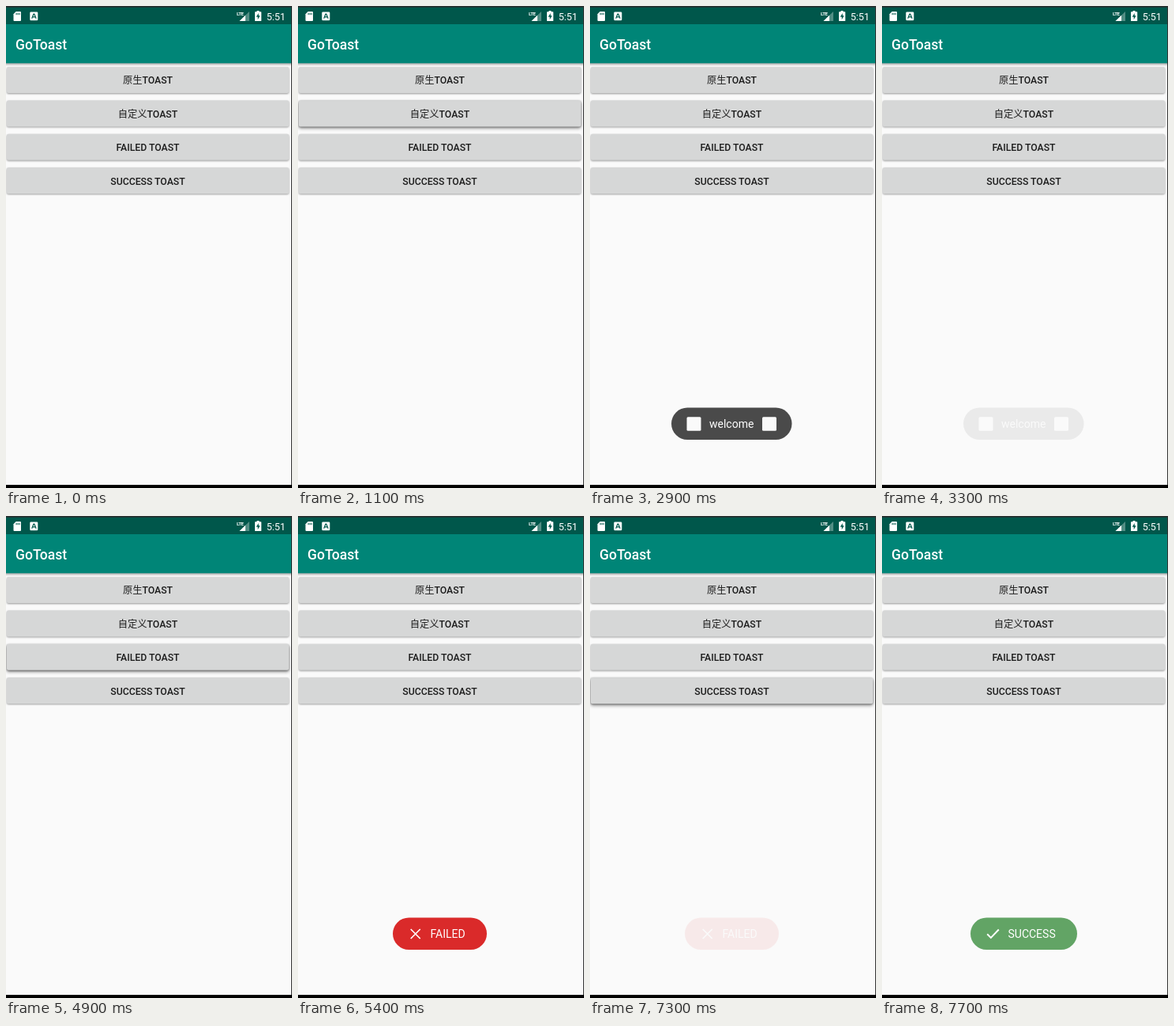
Recreate the animation shown at these times as an HTML page. Size 362x609 px, loop 8000 ms.

```html
<!DOCTYPE html>
<html lang="zh-CN">
<head>
<meta charset="utf-8">
<title>GoToast</title>
<style>
  html, body { margin: 0; width: 362px; height: 609px; overflow: hidden; background: #fafafa; }
  svg { display: block; }
  text { font-family: Roboto, "Noto Sans CJK SC", "Noto Sans CJK", sans-serif; fill: #fff; }
  .label { font-size: 12.25px; font-weight: 500; fill: #1d1d1d; text-anchor: middle; }
  .label .han { font-family: "Noto Sans CJK SC", "Noto Sans CJK", sans-serif; font-weight: 400; }
  .toast text { font-size: 14px; }
  .toast path { fill: none; stroke: #fff; }
</style>
</head>
<body>
<svg width="362" height="609" viewBox="0 0 362 609">
  <defs>
    <linearGradient id="drop" x2="0" y2="1">
      <stop offset="0" stop-opacity=".34"/>
      <stop offset="1" stop-opacity="0"/>
    </linearGradient>
    <filter id="low" x="-5%" y="-30%" width="110%" height="170%"><feGaussianBlur stdDeviation=".9"/></filter>
    <filter id="high" x="-5%" y="-40%" width="110%" height="190%"><feGaussianBlur stdDeviation="2.3"/></filter>
  </defs>

  <rect width="362" height="609" fill="#fafafa"/>
  <g id="buttons"></g>

  <rect y="72" width="361" height="4" fill="url(#drop)"/>
  <rect y="23" width="361" height="49.3" fill="#008577"/>
  <rect y="1" width="361" height="22" fill="#00574b"/>
  <text x="12" y="55" font-size="17.5" font-weight="500">GoToast</text>

  <!-- status bar -->
  <path d="M12.6 7H18a1 1 0 0 1 1 1v10a1 1 0 0 1-1 1h-7.500a1 1 0 0 1-1-1v-7.800z" fill="#fff"/>
  <path d="M13.100 8.800v2.400M15.100 8.800v2.400M17.100 8.800v2.400" stroke="#00574b"/>
  <rect x="30.300" y="7.600" width="10" height="10.600" rx="1.200" fill="#fff"/>
  <path d="M32.700 15.800l2.300-5.800h.8l2.300 5.800M33.800 13.900h3.300" fill="none" stroke="#00574b" stroke-width="1.200"/>
  <path d="M308 7v12h-12.500z" fill="#fff" opacity=".32"/>
  <path d="M303 11.800v7.200h-7.500z" fill="#fff"/>
  <text x="292" y="12" font-size="6.200" font-weight="700" letter-spacing="-.5">LTE</text>
  <path d="M317.500 7.300V6h3v1.300h2.100q.6 0 .6.600v10.500q0 .6-.6.600h-7q-.6 0-.6-.6V7.900q0-.6.600-.6z" fill="#fff"/>
  <path d="M319.700 9l-3 4.800h2v3.400l2.900-4.900h-1.900z" fill="#00574b"/>
  <text x="329.800" y="17.500" font-size="12.500">5:51</text>

  <g class="toast" id="welcome">
    <rect x="103" y="507.500" width="152.500" height="40.500" rx="20.250" fill="#323232"/>
    <rect x="122.500" y="519.300" width="18" height="17.500" rx="1.500" fill="#fafafa"/>
    <rect x="218" y="519.300" width="18" height="17.500" rx="1.500" fill="#fafafa"/>
    <text x="151" y="533">welcome</text>
  </g>
  <g class="toast" id="failed">
    <rect x="120" y="507.500" width="119" height="40.500" rx="20.250" fill="#da2a2a"/>
    <path d="M142.700 522l12 12m0-12l-12 12" stroke-width="1.700"/>
    <text x="167.500" y="533">FAILED</text>
  </g>
  <g class="toast" id="success">
    <rect x="112" y="507.500" width="135" height="40.500" rx="20.250" fill="#62a465"/>
    <path d="M133.200 528.300l4.600 4.600 10-10.400" stroke-width="2"/>
    <text x="159.500" y="533">SUCCESS</text>
  </g>

  <!-- device edges -->
  <rect width="362" height="1.800" fill="#26302f"/>
  <rect x="361" width="1" height="609" fill="#333"/>
  <rect y="605" width="362" height="4" fill="#000"/>
</svg>
<script>
  const LOOP = 8000, STEP = 100;
  const byId = id => document.getElementById(id);

  const labels = [
    '<tspan class="han">原生</tspan>TOAST',
    '<tspan class="han">自定义</tspan>TOAST',
    'FAILED TOAST',
    'SUCCESS TOAST'
  ];

  byId('buttons').innerHTML = labels.map((label, i) => {
    const y = 77 + i * 42.4;
    const box = (dy, attrs) =>
      `<rect x="1" y="${y + dy}" width="357" height="33" rx="2" ${attrs}/>`;
    return `<g>
      ${box(0.9, 'class="flat" filter="url(#low)" opacity=".4"')}
      ${box(2.2, 'class="raised" filter="url(#high)" opacity="0"')}
      ${box(0, 'fill="#d6d7d7"')}
      ${box(0, 'class="ripple" opacity="0"')}
      <text class="label" x="179.500" y="${y + 21.4}">${label}</text>
    </g>`;
  }).join('');

  // one value per step from a start time; the last value holds
  const fadeIn = [0, 0.3, 0.68, 0.93, 1];
  const fadeOut = [0.88, 0.7, 0.49, 0.27, 0.075];
  const lift = [0.4, 0.4, 0.3, 0.12, 0];
  const press = [0, 0.07, 0.05, 0.02, 0];

  const toasts = [
    { id: 'welcome', show: 1100, fade: 2900, gone: 4900 },
    { id: 'failed', show: 5000, fade: 6900, gone: 7400 },
    { id: 'success', show: 7300, fade: Infinity, gone: Infinity }
  ];
  const taps = [{ row: 1, at: 1100 }, { row: 2, at: 4900 }, { row: 3, at: 7300 }];

  function pick(values, start, t) {
    return values[Math.min(values.length - 1, Math.floor((t - start) / STEP))];
  }

  function alphaAt({ show, fade, gone }, t) {
    if (t < show || t >= gone) return 0;
    return t < fade ? pick(fadeIn, show, t) : pick(fadeOut, fade, t);
  }

  function draw(t) {
    for (const toast of toasts) byId(toast.id).setAttribute('opacity', alphaAt(toast, t));
    for (const { row, at } of taps) {
      const button = byId('buttons').children[row];
      const set = (part, value) => button.querySelector(part).setAttribute('opacity', value);
      set('.raised', t < at ? 0 : pick(lift, at, t));
      set('.ripple', t < at ? 0 : pick(press, at, t));
    }
  }

  const start = performance.now();
  function tick() {
    draw((performance.now() - start) % LOOP);
    requestAnimationFrame(tick);
  }
  draw(0);
  requestAnimationFrame(tick);
</script>
</body>
</html>
```
